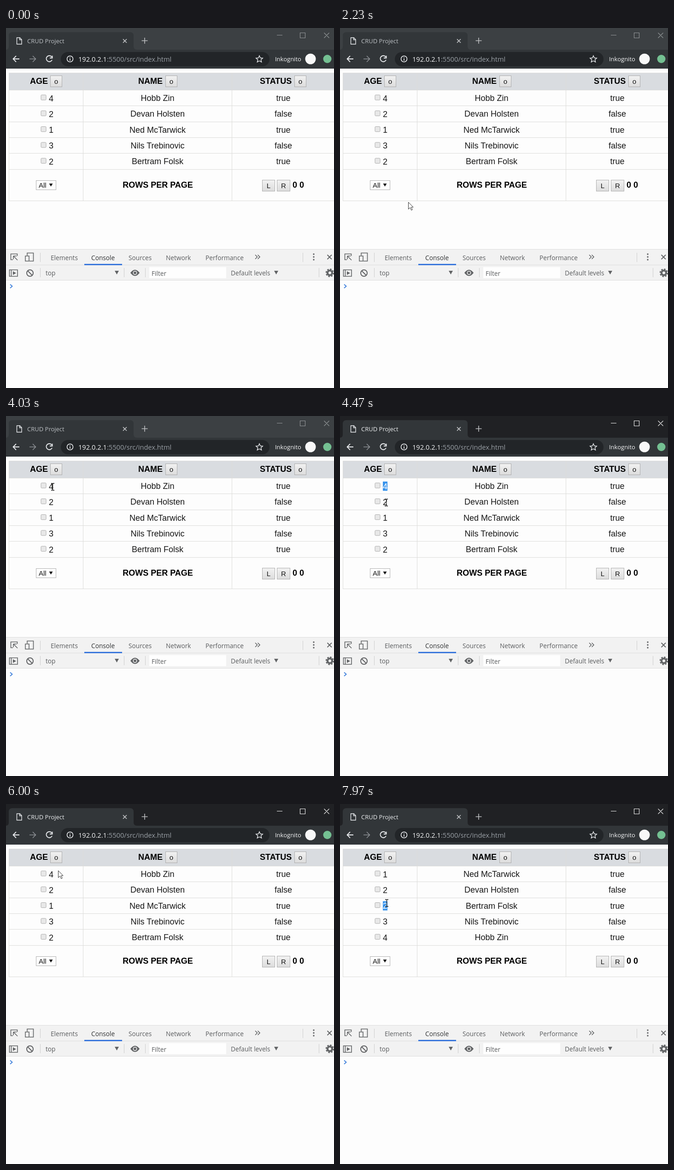
Animation of 712x780 px, one loop 8 s. Source, as an HTML page:

```html
<!DOCTYPE html>
<html lang="en">
<head>
<meta charset="utf-8">
<title>Sortable table</title>
<style>
  html, body { margin: 0; width: 100%; height: 100%; overflow: hidden; background: #fdfdfd; }
  svg { display: block; width: 712px; height: 780px; }
  .ui { font: 13.7px "Open Sans", sans-serif; fill: #5a5c5e; }
  .table { font: 18px "Liberation Sans", Arial, sans-serif; fill: #161616; }
  .table .bold { font-weight: bold; fill: #000; }
  .table .small { font-size: 15px; }
  .mid { text-anchor: middle; }
  .line { fill: none; stroke-width: 1.6; }
</style>
</head>
<body>
<svg viewBox="0 0 712 780">
  <defs>
    <linearGradient id="face" x2="0" y2="1">
      <stop stop-color="#f2f2f2"/><stop offset="1" stop-color="#dcdcdc"/>
    </linearGradient>
  </defs>

  <!-- Browser window -->
  <rect id="frame" width="712" height="50"/>
  <path d="M0 47Q6 47 6 40V17Q6 9 14 9H269Q277 9 277 17V40Q277 47 284 47H712V88H0Z" fill="#323639"/>
  <rect x="119" y="52" width="453" height="31" rx="15.5" fill="#222528"/>
  <g class="line" stroke="#e8eaed">
    <path d="M23.500 21H30L34 25V35H23.500ZM29.500 21V25.500H34" stroke-width="1.400"/>
    <path d="M254 24L262 32M262 24L254 32" stroke="#c4c6c8"/>
    <path d="M294.500 27.500H307.500M301 21V34" stroke="#bcbec0"/>
    <path d="M29 67H16M22 60.500L15.500 67L22 73.500" stroke-width="1.800"/>
    <path d="M51 67H64M58 60.500L64.500 67L58 73.500" stroke="#8c9094"/>
    <path d="M99.500 63A6.500 6.500 0 1 0 100 69M100.500 60V65H95" stroke-width="1.900"/>
    <circle cx="139" cy="67" r="6.500"/>
    <path d="M139 66V71M139 63V64.500"/>
    <path d="M550 60L552.100 64.800L557.300 65.300L553.400 68.700L554.600 73.900L550 71.200L545.400 73.900L546.600 68.700L542.700 65.300L547.900 64.800Z" stroke-width="1.400"/>
  </g>
  <path id="windowButtons" class="line" style="stroke-width:1.1" d="M588 15.500H600M638.500 10.500H649.500V21.500H638.500ZM690.500 10.500L701.500 21.500M701.500 10.500L690.500 21.500"/>
  <g class="ui">
    <text id="tabTitle" x="46" y="32.500" style="font-size:13px">CRUD Project</text>
    <text x="157" y="73" style="font-size:14.650px;fill:#9aa0a6"><tspan style="fill:#f4f5f6">192.0.2.1</tspan>:5500/src/index.html</text>
    <text x="584" y="71.500" style="font-size:13px;fill:#f4f5f6">Inkognito</text>
  </g>
  <circle cx="661" cy="67" r="11.500" fill="#f8f8f8"/>
  <circle cx="697.500" cy="67" r="9" fill="#74c092"/>

  <!-- Page -->
  <rect x="6" y="97" width="706" height="38" fill="#d9dce0"/>
  <path id="grid" fill="none" stroke="#dcdcda"/>
  <g id="table" class="table"></g>

  <!-- Developer tools -->
  <rect y="479" width="712" height="68" fill="#f2f2f2"/>
  <path d="M0 479.500H712M0 513.500H712M0 546.500H712" stroke="#dcdcdc"/>
  <path d="M74.500 487V507M644.500 487V507M74.500 520V540M256.500 520V540M302.500 520V540M679.500 520V540" stroke="#cdcdcd"/>
  <rect x="170" y="511" width="82" height="3" fill="#3b78dc"/>
  <rect x="311" y="518" width="167" height="24" fill="#fefefe"/>
  <g id="tools" class="ui"></g>
  <g class="line" stroke="#626466">
    <path d="M15 502H10.500V489.500H24.500V494M16 494L25 503M16 494V501M16 494H23"/>
    <path d="M46 493V487.500H59.500V505H51M42 494H50V505H42Z"/>
    <path d="M541 491.500L545.500 496L541 500.500M546.500 491.500L551 496L546.500 500.500"/>
    <path d="M697.500 491.500L707 501M707 491.500L697.500 501" stroke-width="1.800"/>
    <path d="M7.500 524H25V538H7.500ZM11.500 524V538"/>
    <circle cx="52" cy="531" r="7" stroke-width="2"/>
    <path d="M47 526L57 536" stroke-width="2"/>
    <circle cx="703" cy="530.500" r="5" stroke-width="4"/>
    <circle cx="703" cy="530.500" r="8" stroke-width="2.500" stroke-dasharray="3.600 2.680"/>
    <path d="M9 555.500L13.500 559.500L9 563.500" stroke="#4484dc" stroke-width="1.900"/>
  </g>
  <g fill="#626466">
    <path d="M15 527L22 531L15 535ZM236 526H245L240.500 534ZM582 526H591L586.500 534Z"/>
    <circle cx="668" cy="490" r="1.700"/><circle cx="668" cy="496" r="1.700"/><circle cx="668" cy="502" r="1.700"/>
    <path d="M270 530.500Q280 517 290 530.500Q280 544 270 530.500Z"/>
    <circle cx="280" cy="530.500" r="3.700" fill="none" stroke="#f2f2f2" stroke-width="1.600"/>
  </g>

  <!-- Pointers, each drawn around its hot spot -->
  <path id="arrow" d="M0 0V15L3.700 11.600L6.300 17.300L8.700 16.200L6.200 10.700H10.500Z" fill="#fefefe" stroke="#303030"/>
  <path id="beam" d="M-3.500 -7.500H-1L0 -6.500L1 -7.500H3.500M0 -6.500V6.500M-3.500 7.500H-1L0 6.500L1 7.500H3.500" fill="none" stroke="#202020" stroke-width="1.300"/>
</svg>

<script>
const $ = id => document.getElementById(id);
const LOOP = 8000, ACTIVATED = 4050, SORTED = 6350;
const ROW_TOP = 134.5, ROW_HEIGHT = 34.3;

const people = [
  [4, 'Hobb Zin', true],
  [2, 'Devan Holsten', false],
  [1, 'Ned McTarwick', true],
  [3, 'Nils Trebinovic', false],
  [2, 'Bertram Folsk', true]
];
const byAge = [...people].sort((a, b) => a[0] - b[0]);

// Start time and selected row (-1 for none)
const selections = [
  [0, -1], [4170, 0], [4600, 1], [5030, 2], [5500, -1],
  [6900, 0], [7400, 1], [7880, 2]
];

// Time, x, y of the pointer
const path = [
  [200, 640, 796], [1000, 148, 377], [2230, 148, 377], [3400, 162, 371],
  [3950, 101, 153], [4250, 101, 155], [4470, 100, 187],
  [4680, 100, 187], [4900, 101, 220], [5150, 101, 220],
  [5450, 122, 215], [5600, 122, 215], [6000, 113, 144],
  [6200, 110, 117], [6450, 110, 117], [6780, 102, 157], [7100, 102, 157],
  [7330, 101, 188], [7560, 101, 188], [7800, 101, 214], [8000, 101, 214]
];

const label = (x, y, text, cls = '') => `<text x="${x}" y="${y}" class="${cls}">${text}</text>`;
const button = (x, y, w, text) =>
  `<rect x="${x + .5}" y="${y + .5}" width="${w - 1}" height="24" fill="url(#face)" stroke="#adadad"/>` +
  label(x + w / 2, y + 18, text, 'small mid');

function drawTable(rows, selected) {
  const body = rows.map(([age, name, status], i) => {
    const top = ROW_TOP + i * ROW_HEIGHT, base = top + 23.5, on = i === selected;
    return `<rect x="76" y="${top + 10.5}" width="11" height="11" rx="1.5" fill="#e8e8e8" stroke="#acacac"/>` +
      (on ? `<rect x="93" y="${top + 7.5}" width="10" height="20" fill="#3994ec"/>` : '') +
      `<text x="93" y="${base + .5}"${on ? ' fill="#fff"' : ''}>${age}</text>` +
      label(329, base, name, 'mid') + label(602, base, status, 'mid');
  }).join('');
  $('table').innerHTML =
    label(52, 121, 'AGE', 'bold') + button(96, 103, 26, 'o') +
    label(287, 121, 'NAME', 'bold') + button(346, 103, 26, 'o') +
    label(551, 121, 'STATUS', 'bold') + button(626, 103, 26, 'o') + body +
    '<rect x="65.5" y="330.500" width="43" height="20" fill="#fefefe" stroke="#b0b0b0"/>' +
    label(71, 345.5, 'All', 'small') + '<path d="M93.500 337H101.500L97.500 343.500Z"/>' +
    label(329.5, 346, 'ROWS PER PAGE', 'bold mid') +
    button(556, 329, 28, 'L') + button(588, 329, 29, 'R') + label(622, 346, '0 0', 'bold');
}

function drawStatic() {
  const lines = [97.5, 374.5];
  for (let i = 0; i <= people.length; i++) lines.push(Math.floor(ROW_TOP + i * ROW_HEIGHT) + .5);
  $('grid').setAttribute('d', lines.map(y => `M6 ${y}H712`).join('') +
    [6.5, 167.5, 490.5].map(x => `M${x} 97V375`).join(''));
  const tabs = [[97, 'Elements'], [185, 'Console'], [266, 'Sources'], [347, 'Network'], [433, 'Performance']];
  $('tools').innerHTML = tabs.map(([x, text]) => label(x, 502.5, text)).join('') +
    label(86, 536, 'top') + label(316, 536.5, 'Filter') + label(488, 536, 'Default levels');
  $('tools').children[1].style.fill = '#303234';
}

function pointerAt(t) {
  const next = path.findIndex(p => p[0] > t);
  if (next <= 0) return path[0].slice(1);
  const [t0, x0, y0] = path[next - 1], [t1, x1, y1] = path[next];
  const u = (t - t0) / (t1 - t0), e = u * u * (3 - 2 * u);
  return [x0 + (x1 - x0) * e, y0 + (y1 - y0) * e];
}

let shown = '';
function render(t) {
  const sorted = t >= SORTED, active = t >= ACTIVATED;
  const selected = selections.filter(s => s[0] <= t).pop()[1];
  const state = `${sorted} ${selected}`;
  if (state !== shown) drawTable(sorted ? byAge : people, selected);
  shown = state;

  $('frame').setAttribute('fill', active ? '#202124' : '#3c4043');
  $('windowButtons').setAttribute('stroke', active ? '#f2f2f2' : '#94979a');
  $('tabTitle').style.fill = active ? '#eceef0' : '#bcc0c4';

  const [x, y] = pointerAt(t);
  const overText = (t > 3900 && t < 5350) || t > 6700;
  for (const [id, visible] of [['arrow', !overText], ['beam', overText]]) {
    $(id).setAttribute('transform', `translate(${Math.round(x) + .5} ${Math.round(y) + .5})`);
    $(id).setAttribute('visibility', visible ? 'visible' : 'hidden');
  }
}

drawStatic();
const start = performance.now();
function tick() {
  render((performance.now() - start) % LOOP);
  requestAnimationFrame(tick);
}
tick();
</script>
</body>
</html>
```
